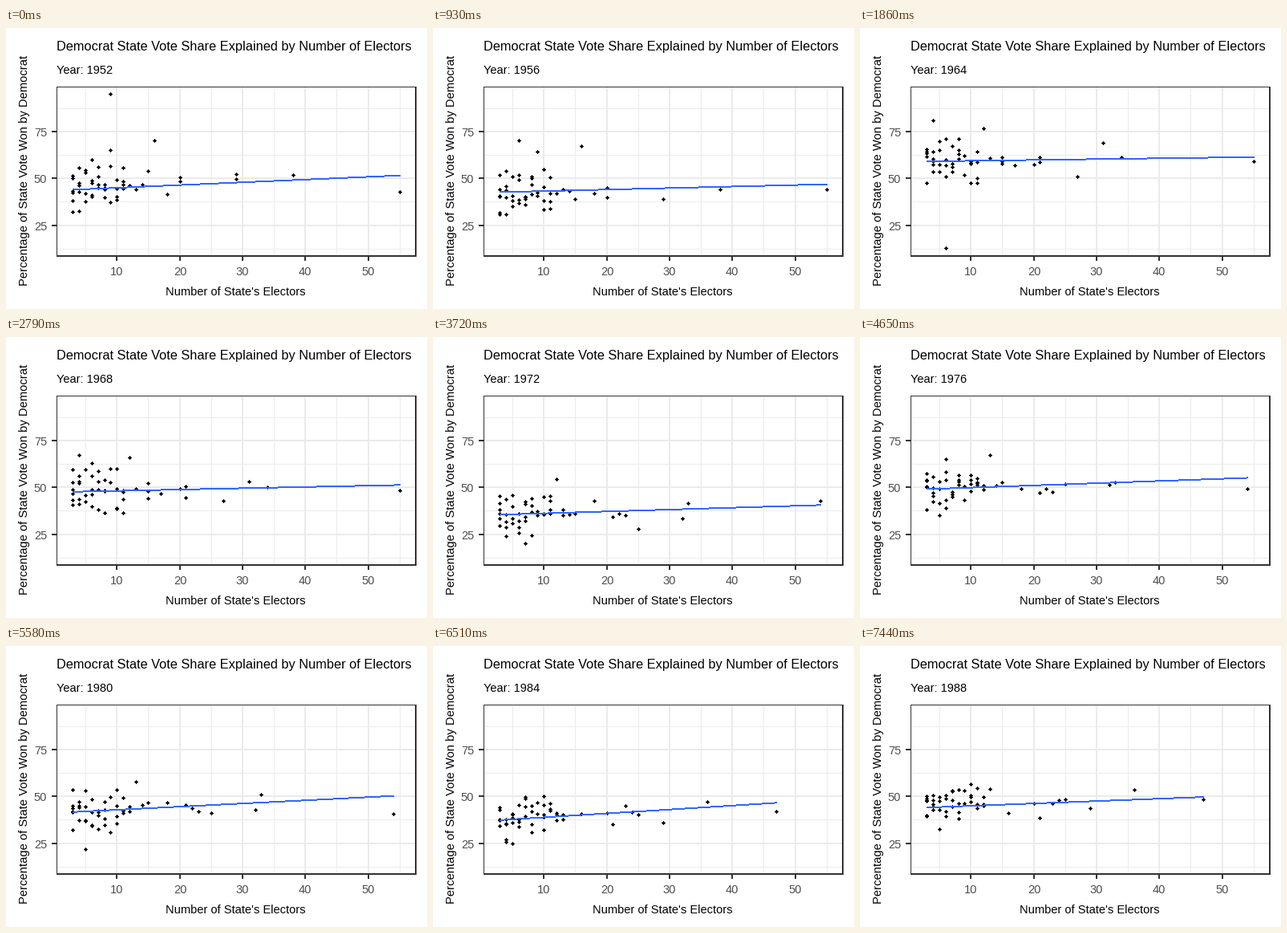
Recreate the animation shown at these times as a matplotlib script. Size 525 by 350 pixels, loop 8000 ms.

```python
import numpy as np
import matplotlib.pyplot as plt
from matplotlib.animation import FuncAnimation
from matplotlib.collections import PolyCollection
from matplotlib.patches import Polygon, Rectangle

W, H, DPI = 525, 350, 100
LOOP, STEP, HOLD = 8000, 40, 930      # milliseconds
LEFT, RIGHT, TOP, BOTTOM = 63, 511, 73, 284
X_RANGE = (0.39, 57.59)
Y_RANGE = (8.554, 98.85)
GRID, DARK, GREY, BLUE = "#EBEBEB", "#333333", "#4D4D4D", "#3366FF"

# How many states have 3, 4, ... 11 electors, and the sizes of the larger states
SMALL = np.repeat(np.arange(3, 12), (6, 5, 4, 4, 4, 4, 2, 4, 4))
LARGE = {
    55: (12, 13, 14, 15, 16, 18, 20, 20, 29, 29, 38),
    56: (12, 13, 15, 15, 15, 17, 20, 21, 21, 27, 31, 34),
    54: (12, 12, 13, 13, 14, 15, 18, 21, 22, 23, 25, 32, 33),
    47: (12, 12, 12, 13, 13, 16, 20, 21, 23, 24, 25, 29, 36),
}
# year, key into LARGE, fitted share at both ends, dots that stand out
YEARS = [
    (1952, 55, 43.9, 51.5, [(9, 95), (16, 70), (9, 65), (6, 60), (15, 54), (55, 43)]),
    (1956, 55, 42.6, 46.8, [(6, 70), (16, 67), (9, 64), (29, 39), (55, 44)]),
    (1964, 56, 59.0, 61.3, [(6, 13), (4, 81), (12, 76.5), (31, 68.7), (27, 51), (55, 59)]),
    (1968, 56, 47.6, 51.2, [(4, 67), (12, 65.7), (6, 63), (27, 43), (31, 53), (55, 48.3)]),
    (1972, 54, 35.4, 40.5, [(12, 54.5), (7, 20), (18, 43), (25, 28), (32, 33.4), (54, 43)]),
    (1976, 54, 49.0, 55.0, [(13, 67), (6, 65), (5, 35), (54, 49)]),
    (1980, 54, 41.6, 50.2, [(13, 57.7), (5, 22), (25, 41), (33, 51), (32, 43), (54, 40.5)]),
    (1984, 47, 37.3, 46.5, [(5, 25), (10, 50), (21, 35), (29, 36), (36, 47), (47, 42)]),
    (1988, 47, 44.0, 49.6, [(5, 32.6), (13, 54), (21, 38.7), (29, 43.6), (36, 53.5), (47, 48.5)]),
]


def px(x):
    return LEFT + (np.asarray(x) - X_RANGE[0]) / (X_RANGE[1] - X_RANGE[0]) * (RIGHT - LEFT)


def py(y):
    return BOTTOM - (np.asarray(y) - Y_RANGE[0]) / (Y_RANGE[1] - Y_RANGE[0]) * (BOTTOM - TOP)


def dot_shape():
    """Outline of a five pixel wide dot with stepped edges."""
    half = np.repeat([0.5, 1.5, 2.5, 1.5, 0.5], 2)
    edge = np.repeat(np.arange(6) - 2.5, 2)[1:-1]
    return np.column_stack([np.r_[half, -half[::-1]], np.r_[edge, edge[::-1]]])


def line_shape(x, y, width=2):
    """Outline of a straight line that climbs in whole pixels."""
    cols = np.arange(np.rint(x[0]), np.rint(x[1]) + 1)
    rows = np.repeat(np.rint(np.interp(cols, x, y)), 2) - width / 2
    edges = np.column_stack([cols, cols + 1]).ravel()
    return np.column_stack([np.r_[edges, edges[::-1]], np.r_[rows, rows[::-1] + width]])


def make_year(year, group, start, end, standouts):
    """Scatter the states around the fitted line, standouts in their own place."""
    rng = np.random.default_rng(year)
    key_x, key_y = np.array(standouts, float).T
    large = [n for n in LARGE[group] if n not in key_x]
    ends = (3, key_x.max())

    def scatter(n, spread):
        noise = np.clip(rng.normal(0, 1, len(n)), -1.8, 1.8)
        return np.interp(n, ends, (start, end)) + spread * noise

    x = np.r_[SMALL, large, key_x]
    y = np.r_[scatter(SMALL, 6.5), scatter(large, 2.5), key_y]
    centres = np.column_stack([np.rint(px(x)), np.rint(py(y))]) + 0.5
    return (f"Year: {year}", centres[:, None] + dot_shape(),
            line_shape(px(ends), py((start, end))))


scenes = [make_year(*row) for row in YEARS]

plt.rcParams["font.family"] = "Liberation Sans"
fig = plt.figure(figsize=(W / DPI, H / DPI), dpi=DPI, facecolor="white")
ax = fig.add_axes([0, 0, 1, 1])
ax.set(xlim=(0, W), ylim=(H, 0))
ax.axis("off")


def pt(pixels):
    return pixels * 72 / DPI


def box(x, y, w, h, color, z):
    ax.add_patch(Rectangle((x, y), w, h, fc=color, lw=0, antialiased=False, zorder=z))


def label(x, y, text, size=14.67, color="black", **kw):
    return ax.text(x, y, text, fontsize=pt(size), color=color, va="baseline", **kw)


def grid(xs, ys, width, z):
    for x in np.rint(px(xs)):
        box(x - width // 2, TOP, width, BOTTOM - TOP, GRID, z)
    for y in np.rint(py(ys)):
        box(LEFT, y - width // 2, RIGHT - LEFT, width, GRID, z)


x_ticks, y_ticks = [10, 20, 30, 40, 50], [25, 50, 75]
grid(range(5, 56, 10), [12.5, 37.5, 62.5, 87.5], 1, 1)
grid(x_ticks, y_ticks, 2, 2)

# panel border, thinner at the left and top
box(LEFT, TOP, RIGHT - LEFT + 1, 1, DARK, 6)
box(LEFT, TOP, 1, BOTTOM - TOP + 1, DARK, 6)
box(LEFT, BOTTOM - 1, RIGHT - LEFT + 1, 2, DARK, 6)
box(RIGHT - 1, TOP, 2, BOTTOM - TOP + 1, DARK, 6)

# ticks and their numbers
for v in x_ticks:
    x = np.rint(px(v))
    box(x - 1, BOTTOM, 2, 6, DARK, 6)
    label(x, 308, str(v), color=GREY, ha="center")
for v in y_ticks:
    y = np.rint(py(v))
    box(LEFT - 6, y - 1, 6, 2, DARK, 6)
    label(51, y + 6, str(v), color=GREY, ha="right")

label(63, 28, "Democrat State Vote Share Explained by Number of Electors", 16.4)
label(286.5, 333, "Number of State's Electors", ha="center")
label(27, 177.7, "Percentage of State Vote Won by Democrat", 14.75,
      rotation=90, rotation_mode="anchor", ha="center")
caption = label(63, 57, "")

dots = PolyCollection([], facecolor="black", linewidth=0, zorder=4, snap=False)
ax.add_collection(dots, autolim=False)
trend = ax.add_patch(Polygon(scenes[0][2], fc=BLUE, lw=0, zorder=5, snap=False))


def update(i):
    k = min((i * STEP + STEP - 1) // HOLD, len(scenes) - 1)
    text, shapes, line = scenes[k]
    caption.set_text(text)
    dots.set_verts(shapes)
    trend.set_xy(line)
    return caption, dots, trend


anim = FuncAnimation(fig, update, frames=LOOP // STEP, interval=STEP,
                     repeat=True, repeat_delay=0)
plt.show()
```
